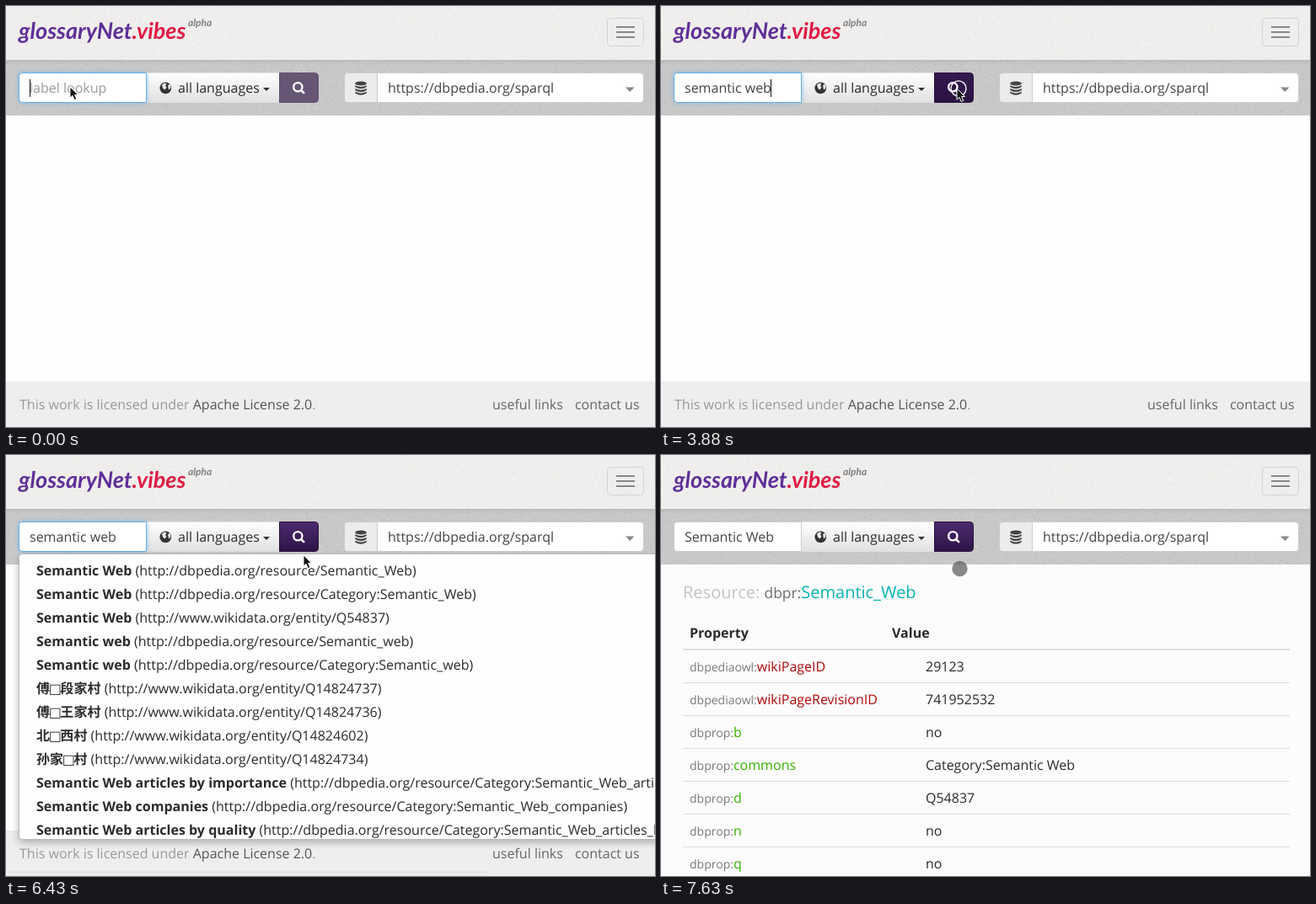
Recreate the animation shown at these times as an HTML page. Size 770x500 px, loop 8000 ms.

```html
<!DOCTYPE html>
<html lang="en">
<head>
<meta charset="utf-8">
<title>Label lookup</title>
<style>
  html, body { margin: 0; width: 100%; height: 100%; overflow: hidden; background: #fefefe; }
  svg { display: block; }
  text { font: 16px "Open Sans", sans-serif; fill: #444; white-space: pre; text-rendering: geometricPrecision; }
  .logo { font: italic 700 27px Lato, sans-serif; fill: #5f2f98; }
  .alpha { font: italic 700 12px Lato, sans-serif; fill: #808080; }
  .b { font-weight: 700; }
  .dark, .dark text { fill: #2b2b2b; }
  #items text { font-size: 16.05px; }
  .cjk { font-family: "Noto Sans CJK SC", "Noto Sans CJK", "Noto Sans CJK JP", sans-serif; font-weight: 700; }
  .box { font: 700 16px "DejaVu Sans", sans-serif; letter-spacing: -1.4px; }
  .small { font-size: 14px; fill: #7a7a7a; }
</style>
</head>
<body>
<svg id="stage" width="770" height="500" viewBox="0 0 770 500">
  <defs>
    <linearGradient id="lang" x2="0" y2="1"><stop stop-color="#fff"/><stop offset="1" stop-color="#e0e0e0"/></linearGradient>
    <linearGradient id="on" x2="0" y2="1"><stop stop-color="#4c2a70"/><stop offset="1" stop-color="#2c1545"/></linearGradient>
    <linearGradient id="hot" x2="0" y2="1"><stop stop-color="#33194e"/><stop offset="1" stop-color="#2a1342"/></linearGradient>
    <linearGradient id="row" x2="0" y2="1"><stop stop-color="#f5f5f5"/><stop offset="1" stop-color="#e8e8e8"/></linearGradient>
    <linearGradient id="inset" x2="0" y2="1"><stop stop-opacity=".05"/><stop offset="1" stop-opacity="0"/></linearGradient>
    <filter id="glow" x="-20%" y="-40%" width="140%" height="180%"><feGaussianBlur stdDeviation="2.5"/></filter>
    <filter id="drop" x="-5%" y="-5%" width="110%" height="112%"><feGaussianBlur stdDeviation="5"/></filter>
    <clipPath id="fieldClip"><rect id="fieldBox" x="27" y="82" height="30"/></clipPath>
    <clipPath id="menuClip"><rect x="16" y="118" width="760" height="338"/></clipPath>
  </defs>

  <rect id="page" y="130" width="770" height="370"/>
  <g id="footer">
    <rect y="446" width="770" height="54" fill="#eee"/>
    <text x="16" y="479" style="fill:#999">This work is licensed under <tspan fill="#555">Apache License 2.0</tspan>.</text>
    <text x="577" y="479" style="fill:#666">useful links</text>
    <text x="675" y="479" style="fill:#666">contact us</text>
  </g>
  <rect id="scroll" x="3" y="494" width="572" height="3" rx="1.5"/>
  <g id="result"></g>
  <rect id="progress" y="130" height="4" fill="#4c2a70"/>

  <rect width="770" height="64" fill="#efeeec"/>
  <rect y="65" width="770" height="65" fill="#c8c8c8"/>
  <g id="grain"></g>
  <rect y="64" width="770" height="1" fill="#bcbcbc"/>
  <rect y="65" width="770" height="5" fill="url(#inset)"/>

  <text class="logo" x="15" y="39">glossaryNet<tspan fill="#e01b42">.vibes</tspan></text>
  <text class="alpha" x="216" y="24">alpha</text>
  <rect x="713.5" y="14.5" width="43" height="33" rx="4" fill="none" stroke="#d4d4d4"/>
  <path d="M724 25h22M724 31h22M724 37h22" stroke="#888" stroke-width="2"/>

  <rect x="402" y="79.5" width="354.500" height="35" rx="4" fill="#fff" stroke="#ccc"/>
  <path d="M440.500 80v34H406a4 4 0 0 1-4-4V84a4 4 0 0 1 4-4z" fill="#ececec"/>
  <path d="M440.500 80v34.500" stroke="#ccc"/>
  <g fill="#444">
    <ellipse cx="421" cy="92" rx="6.800" ry="2.400"/>
    <path id="disk" d="M414.200 94.200q6.800 3.400 13.600 0v1.800q-6.800 4.400-13.600 0z"/>
    <use href="#disk" y="3.900"/><use href="#disk" y="7.600"/>
  </g>
  <text x="453" y="103">https://dbpedia.org/sparql</text>
  <path d="M735 96.500h10.500l-5.250 5.500z" fill="#888"/>

  <g id="language">
    <rect x="167" y="79.500" width="157" height="35.500" fill="url(#lang)"/>
    <circle cx="189.300" cy="97.300" r="6.860" fill="#333"/>
    <path d="M185 93.500l3-2 2.500 1-1.500 2.500 1.500 1.500-2 3-2.500-2zM192 94l3-1 .500 4.500-2.500 2z" fill="#eee"/>
    <text class="dark" x="204" y="103">all languages</text>
    <path d="M305 97h8l-4 4z" fill="#333"/>
  </g>

  <rect id="halo" x="15" y="79" height="36" rx="4" fill="#66afe9" filter="url(#glow)" opacity=".8"/>
  <path id="field" fill="#fff"/>
  <g clip-path="url(#fieldClip)">
    <text id="typed" x="28" y="103"></text>
    <rect id="caret" y="87" width="1" height="21" fill="#111"/>
  </g>

  <path id="button"/>
  <g id="lens" fill="none" stroke="#fff">
    <circle cx="346.300" cy="96.300" r="5.150" stroke-width="2.300"/>
    <path d="M350 100l3.200 3.200" stroke-width="2.600" stroke-linecap="round"/>
  </g>
  <g id="abort">
    <g id="spinner"></g>
    <text x="317" y="103" style="fill:#f4f1f6">abort</text>
  </g>

  <g id="menu">
    <rect x="15" y="122" width="800" height="338" rx="4" opacity=".28" filter="url(#drop)"/>
    <rect x="15.500" y="117.500" width="800" height="339" rx="4" fill="#fefefe" stroke="#bbb"/>
    <rect id="hover" x="16" y="123" width="754" height="28" fill="url(#row)"/>
    <g id="items" class="dark" clip-path="url(#menuClip)"></g>
  </g>

  <circle id="ring" cx="353" cy="98" r="9" fill="none" stroke="#e8e4ec" stroke-width="1.500"/>
  <path id="arrow" d="M0 0v13.200l3-2.800 2.200 5.200 2.600-1.100-2.200-5h4z" fill="#111" stroke="#fff" stroke-linejoin="round"/>
  <circle id="touch" cx="354.500" cy="135" r="9.200" fill="#555" fill-opacity=".7"/>
</svg>

<script>
const LOOP = 8000;
const $ = id => document.getElementById(id);
const show = (id, on) => { $(id).style.display = on ? "" : "none"; };
const set = (id, attrs) => { for (const k in attrs) $(id).setAttribute(k, attrs[k]); };

// Paper grain
let seed = 11;
const rand = () => (seed = seed * 16807 % 2147483647) / 2147483647;
function specks(count, top, height, color, alpha) {
  let d = "";
  for (let i = 0; i < count; i++) {
    const w = rand() < .3 ? 2 : 1;
    d += `M${rand() * 770 | 0} ${top + (rand() * height | 0)}h${w}v1h-${w}z`;
  }
  return `<path d="${d}" fill="${color}" fill-opacity="${alpha}"/>`;
}
$("grain").innerHTML =
  specks(1500, 0, 64, "#000", .035) + specks(1000, 0, 64, "#fff", .4) +
  specks(1900, 65, 65, "#000", .05) + specks(1500, 65, 65, "#fff", .14);

// Suggestions
const db = "http://dbpedia.org/resource/", wiki = "http://www.wikidata.org/entity/";
const items = [
  ["Semantic Web", db + "Semantic_Web"],
  ["Semantic Web", db + "Category:Semantic_Web"],
  ["Semantic Web", wiki + "Q54837"],
  ["Semantic web", db + "Semantic_web"],
  ["Semantic web", db + "Category:Semantic_web"],
  ["傅□段家村", wiki + "Q14824737"],
  ["傅□王家村", wiki + "Q14824736"],
  ["北□西村", wiki + "Q14824602"],
  ["孙家□村", wiki + "Q14824734"],
  ["Semantic Web articles by importance", db + "Category:Semantic_Web_articles_by_importance"],
  ["Semantic Web companies", db + "Category:Semantic_Web_companies"],
  ["Semantic Web articles by quality", db + "Category:Semantic_Web_articles_by_quality"]
];
$("items").innerHTML = items.map(([label, url], i) => {
  const kind = label.includes("□") ? "cjk" : "b";
  const name = label.replace("□", '<tspan class="box" dx="-1.4">□</tspan>');
  return `<text x="36" y="${143 + 28 * i}"><tspan class="${kind}">${name}</tspan> (${url})</text>`;
}).join("");

// Resource table
const red = "#b00808", green = "#35b000";
const rows = [
  ["dbpediaowl:", "wikiPageID", "29123", red],
  ["dbpediaowl:", "wikiPageRevisionID", "741952532", red],
  ["dbprop:", "b", "no", green],
  ["dbprop:", "commons", "Category:Semantic Web", green],
  ["dbprop:", "d", "Q54837", green],
  ["dbprop:", "n", "no", green],
  ["dbprop:", "q", "no", green]
];
$("result").innerHTML = `
  <text x="26" y="170" style="font-size:20px;fill:#c4c4c4">Resource: <tspan
    style="font-size:17.4px" fill="#6c6c6c">dbpr:</tspan><tspan fill="#08b2b0">Semantic_Web</tspan></text>
  <text class="b dark" x="34" y="217">Property</text>
  <text class="b dark" x="274" y="217">Value</text>
  <rect x="26" y="230" width="720" height="2" fill="#ddd"/>` +
  rows.map(([ns, key, value, color], i) => {
    const y = 257 + 39 * i;
    return `<text x="34" y="${y}"><tspan class="small">${ns}</tspan><tspan fill="${color}">${key}</tspan></text>
      <text class="dark" x="314" y="${y}">${value}</text>
      <rect x="26" y="${y + 13}" width="720" height="1" fill="#ddd"/>`;
  }).join("");

$("spinner").innerHTML = Array.from({ length: 8 }, (_, i) => {
  const a = i * Math.PI / 4;
  return `<circle cx="${6 * Math.cos(a)}" cy="${6 * Math.sin(a)}" r="${1.15 + i * .09}" fill="#f4f1f6" opacity="${.65 + i * .05}"/>`;
}).join("");

// Timed steps
const word = "semantic web";
const keys = [150, 300, 600, 750, 1050, 1350, 1500, 1800, 1950, 2090, 2390, 2690];
const moves = [
  [0, 76, 96], [2990, 72, 97], [3140, 60, 98], [3290, 105, 99], [3440, 195, 100],
  [3590, 285, 100], [3730, 340, 99], [3880, 351, 98],
  [6130, 351, 101], [6280, 352, 109], [6430, 353, 119], [6580, 354, 129], [6730, 354, 133]
];
const bars = [[7030, 80], [7180, 130], [7330, 178]];
const at = (table, t) => table.filter(s => s[0] <= t).pop();
const between = (t, a, b) => t >= a && t < b;

function draw(t) {
  const busy = between(t, 4030, 5380);
  const picked = t >= 7030, done = t >= 7630;
  const right = busy ? 122 : 167;

  set("page", { fill: done ? "#fcfcfc" : "#fefefe" });
  show("footer", !done);
  show("result", done);
  show("scroll", between(t, 5380, 7630));
  set("scroll", { fill: t < 5530 ? "#d6d6d6" : "#e7e7e7" });
  show("progress", picked && !done);
  set("progress", { width: (at(bars, t) || [0, 0])[1] });

  // Text field
  const typed = keys.filter(k => k <= t).length;
  const text = picked ? "Semantic Web" : word.slice(0, typed);
  const label = $("typed");
  const value = text || "label lookup";
  if (label.textContent !== value) label.textContent = value;
  label.style.fill = text ? "#444" : "#999";
  set("field", {
    d: `M${right - .5} 79.500V114.500H19.500a4 4 0 0 1-4-4V83.500a4 4 0 0 1 4-4z`,
    stroke: picked ? "#ccc" : "#66afe9"
  });
  set("halo", { width: right - 15 });
  show("halo", !picked);
  set("fieldBox", { width: right - 40 });
  show("caret", t < 6130);
  set("caret", { x: text ? Math.round(27.500 + label.getComputedTextLength()) : 28 });
  set("language", { transform: `translate(${busy ? -45 : 0})` });

  // Search button
  const [, x, y] = at(moves, t);
  const over = x > 324 && y < 115;
  const off = t < 600 || busy;
  const left = busy ? 279.5 : 324.5, end = busy ? 369.5 : 370.5;
  set("button", {
    d: `M${left} 79.500H${end - 4}a4 4 0 0 1 4 4V110.500a4 4 0 0 1-4 4H${left}z`,
    fill: off ? "#665673" : over ? "url(#hot)" : "url(#on)",
    stroke: off ? "#625170" : "#2a1340"
  });
  show("lens", !busy);
  show("abort", busy);
  const turn = Math.floor((t - 4030) / 150) * 27;
  set("spinner", { transform: `translate(302.500 97) rotate(${turn})` });

  // Menu and pointer
  show("menu", between(t, 5380, 7030));
  show("hover", y >= 123);
  set("arrow", { transform: `translate(${x} ${y})` });
  show("arrow", t < 6880);
  show("ring", between(t, 3880, 4030));
  show("touch", t >= 6880);
}

const start = performance.now();
function tick() {
  draw((performance.now() - start) % LOOP);
  requestAnimationFrame(tick);
}
tick();
</script>
</body>
</html>
```
